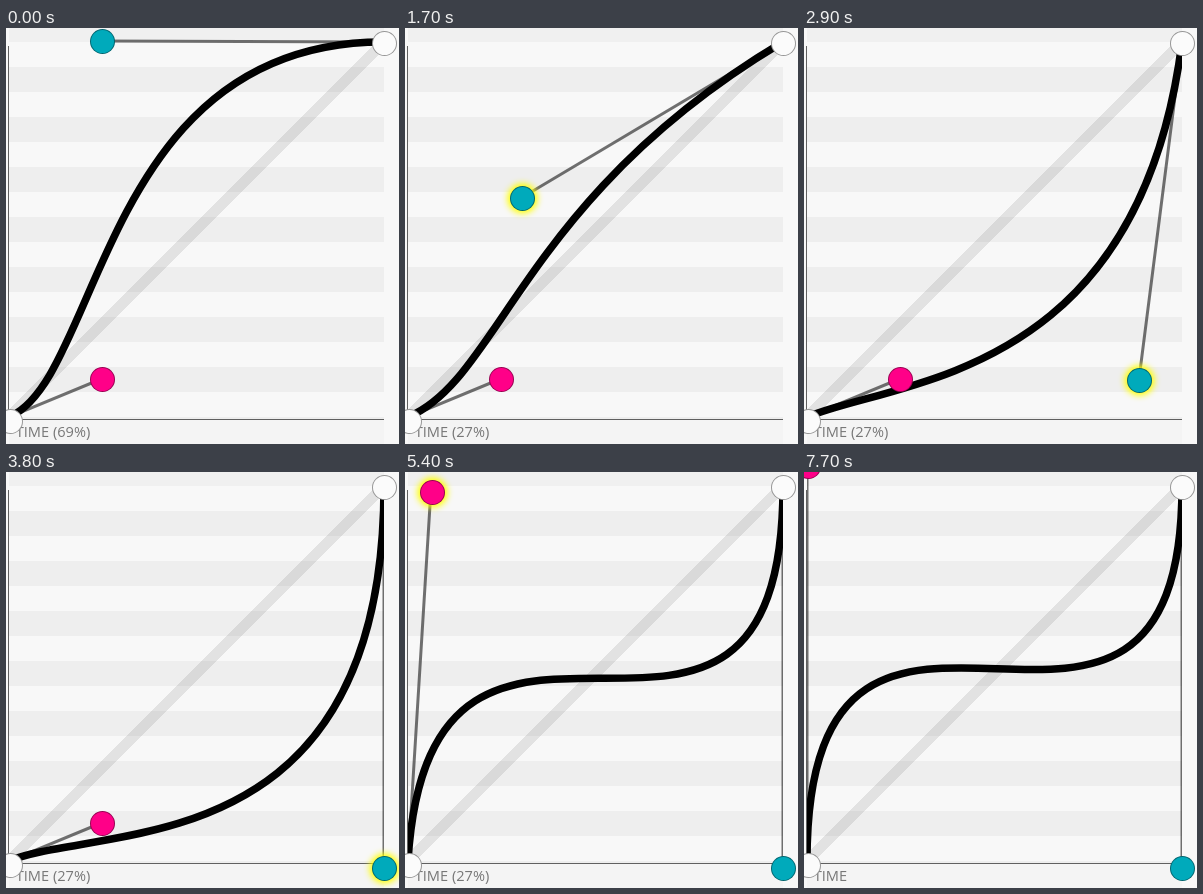
Write an HTML page that moves like this. It is 393x416 px and loops after 7.8 s.

```html
<!DOCTYPE html>
<html lang="en">
<head>
<meta charset="utf-8">
<title>Curve editor</title>
<style>
  html, body { margin: 0; width: 100%; height: 100%; overflow: hidden; background: #f8f8f8; }
  #stage { position: relative; width: 393px; height: 416px; overflow: hidden; }
  #stage > * { position: absolute; }
  .stripes {
    left: 3px; top: 0; width: 375px; height: 391px;
    background: repeating-linear-gradient(#f8f8f8 0 25px, #eee 25px 50px) 0 14px;
  }
  .stripes::before { content: ""; position: absolute; width: 100%; height: 14px; background: #f0f0f0; }
  .foot { left: 3px; top: 392px; width: 375px; height: 24px; background: #f4f4f4; }
  .diagonal {
    left: 3px; top: 14px; width: 375px; height: 375px;
    background: linear-gradient(-45deg, transparent 49%, rgba(0,0,0,.09) 49% 51%, transparent 51%);
  }
  .axis { background: #606060; }
  .axis.y { left: 2px; top: 18px; width: 1px; height: 374px; }
  .axis.x { left: 2px; top: 391px; width: 376px; height: 1px; }
  svg { left: 0; top: 0; }
  #label {
    left: 9.7px; top: 393px; line-height: 20px; white-space: pre; color: #777;
    font-family: "Open Sans", "Noto Sans", sans-serif; font-size: 14.6px;
  }
  .knob {
    left: -12px; top: -12px; width: 25px; height: 25px; box-sizing: border-box;
    border: 1px solid rgba(0,0,0,.4); border-radius: 50%;
  }
  .end { background: #fbfbfb; }
  #pink { background: #f08; }
  #cyan { background: #0ab; }
  .focus { box-shadow: 0 0 6px 2.5px #ff0; }
</style>
</head>
<body>
<div id="stage">
  <div class="stripes"></div>
  <div class="foot"></div>
  <div class="diagonal"></div>
  <div class="axis y"></div>
  <div class="axis x"></div>
  <div id="label">TIME</div>
  <svg width="393" height="416" fill="none">
    <clipPath id="plane"><rect x="3" width="375" height="416"/></clipPath>
    <g clip-path="url(#plane)">
      <path id="arms" stroke="#000" stroke-opacity=".55" stroke-width="3"/>
      <path id="curve" stroke="#000" stroke-width="7.5"/>
    </g>
  </svg>
  <div class="knob end" style="transform:translate(4px,393px)"></div>
  <div class="knob end" style="transform:translate(378px,15px)"></div>
  <div class="knob" id="pink"></div>
  <div class="knob" id="cyan"></div>
</div>
<script>
const LOOP = 7800, STEP = 100;
const START = '3 389', END = '378 14';
const $ = id => document.getElementById(id);
const [label, arms, curve, pink, cyan] = ['label', 'arms', 'curve', 'pink', 'cyan'].map($);

// Drag paths: [time, x, y]
const cyanPath = [
  [500, 96, 13], [1000, 69, 72], [1600, 104, 155], [2300, 224, 261],
  [2900, 335, 352], [3200, 368, 384], [3400, 368, 384], [3800, 378, 396]
];
const pinkPath = [
  [4500, 96, 351], [4750, 78, 240], [5000, 53, 101], [5300, 33, 31],
  [5600, 16, 9], [6000, 4, -6]
];
// Percentage readout: [time, text]
const readout = [
  [0, '69'], [100, '60'], [200, '46'], [300, '34'], [400, '27'],
  [4100, '82'], [4200, '48'], [4300, '27'], [6900, '3'], [7000, '']
];

// Tangent at a key; zero at both ends and next to a pause
function slope(path, i, k) {
  const a = path[i - 1], p = path[i], b = path[i + 1];
  if (!a || !b || a[k] === p[k] || b[k] === p[k]) return 0;
  return (b[k] - a[k]) / (b[0] - a[0]);
}

function along(path, t) {
  const last = path.length - 1;
  if (t <= path[0][0]) return path[0].slice(1);
  if (t >= path[last][0]) return path[last].slice(1);
  const i = path.findIndex(p => p[0] > t) - 1;
  const a = path[i], b = path[i + 1], d = b[0] - a[0], u = (t - a[0]) / d;
  const v = 1 - u;
  return [1, 2].map(k =>
    v * v * (1 + 2 * u) * a[k] + u * u * (3 - 2 * u) * b[k] +
    d * u * v * (v * slope(path, i, k) - u * slope(path, i + 1, k)));
}

function place(knob, [x, y], focused) {
  knob.style.transform = `translate(${Math.round(x)}px,${Math.round(y)}px)`;
  knob.classList.toggle('focus', focused);
}

// Knob centre to curve coordinates: 374px of travel spans the 375px plane
const toPlane = ([x, y]) => `${3 + (x - 4) * 375 / 374} ${y}`;

function draw(t) {
  const p = along(pinkPath, t), c = along(cyanPath, t);
  place(pink, p, t >= 4600 && t < 7700);
  place(cyan, c, t >= 600 && t < 4600);
  const p1 = toPlane(p), p2 = toPlane(c);
  arms.setAttribute('d', `M${START}L${p1}M${END}L${p2}`);
  curve.setAttribute('d', `M${START}C${p1} ${p2} ${END}`);
  const value = readout.filter(r => r[0] <= t).pop()[1];
  label.textContent = value ? `TIME (${value}%)` : 'TIME';
}

const begin = performance.now();
function tick() {
  const t = (performance.now() - begin) % LOOP;
  draw(Math.floor(t / STEP) * STEP);
  requestAnimationFrame(tick);
}
tick();
</script>
</body>
</html>
```
